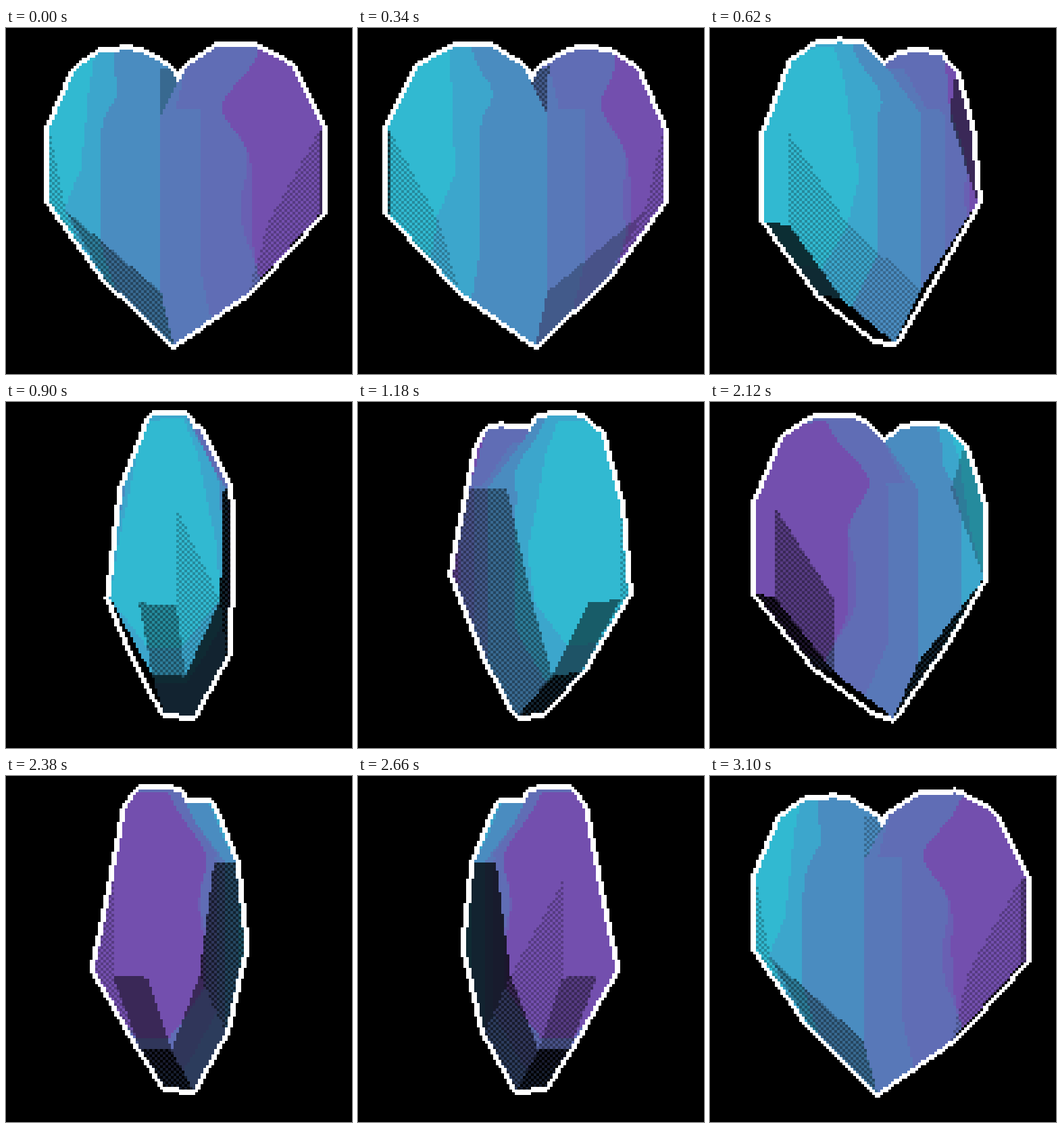
An HTML page with a canvas that plays this animation: 512 px wide and 512 px high, repeating every 3.12 s.

```html
<!DOCTYPE html>
<html lang="en">
<head>
<meta charset="utf-8">
<title>Turning gem heart</title>
<style>
html, body { margin: 0; width: 100%; height: 100%; overflow: hidden; background: #000; }
canvas { display: block; width: 512px; height: 512px; image-rendering: pixelated; }
</style>
</head>
<body>
<canvas id="c" width="128" height="128"></canvas>
<script>
const N = 128, PX = 4, LOOP = 3120, STEP = 20;
const EYE = 1000, CX = 256, HORIZON = 132;
const ctx = document.getElementById('c').getContext('2d');
const img = ctx.createImageData(N, N);
const depth = new Float32Array(N * N);

// Colour bands run from left to right; their borders bend with the height y.
const bands = [[49, 185, 209], [60, 166, 204], [74, 140, 192], [88, 120, 184],
  [96, 109, 181], [105, 96, 179], [115, 79, 174]];
const clamp = (v, lo, hi) => Math.max(lo, Math.min(hi, v));
const bump = (y, mid, width) => Math.exp(-(((y - mid) / width) ** 2));
const purple = y => 128 - 42 * bump(y, -15, 45);
const borders = [
  y => -128 - 25 * clamp((y - 75) / 57, 0, 1),
  y => -95 + 21 * bump(y, -35, 30),
  () => 0,
  y => y < -10 ? 20 : 57,
  y => purple(y) - 14 * bump(y, 120, 50),
  purple
];
const bandAt = (x, y) => bands[borders.findLastIndex(edge => x > edge(y)) + 1];

const sub = (a, b) => a.map((v, i) => v - b[i]);
const dot = (a, b) => a[0] * b[0] + a[1] * b[1] + a[2] * b[2];
const cross = (a, b) => [a[1] * b[2] - a[2] * b[1], a[2] * b[0] - a[0] * b[2], a[0] * b[1] - a[1] * b[0]];

// Shades give a light level from 0 to 8. n is the turned normal;
// near tells how far this end of the heart points at the viewer.
const full = () => 8;
const lit = n => 16 * n[2] + 0.5 * n[0] - 8.2 * n[1] - 1.7;
const shoulder = (n, near) => near < 0 ? 8 - 10 * near ** 4 : 8;
const frontSide = () => 7;
const backSide = (n, near) => 2 + 7 * Math.max(0, near) ** 2;

const faces = [];
function addFace(pts, shade, sx = 1) {
  let n = cross(sub(pts[1], pts[0]), sub(pts[2], pts[0]));
  const len = Math.hypot(...n) * Math.sign(dot(n, sub(pts[0], [0, 100, 0])));
  n = n.map(v => v / len);
  faces.push({ pts, n, shade, sx });
}

// One quarter of the mesh, mirrored below; y points down from eye level.
const RIM = 22, FRONT = 70;
const [A, J, F, B] = [[0, -4], [72, -4], [151, 136], [0, 242]].map(p => [...p, FRONT]);
const rim = [[20, -73], [66, -99], [117, -99], [162, -73], [208, 19], [208, 132], [112, 243], [0, 330]]
  .map(p => [...p, RIM]);
const [S1, S2, S3, S4, E, G, H, C] = rim;
const flip = (p, sx, sz) => [p[0] * sx, p[1], p[2] * sz];

for (const sz of [-1, 1]) {
  for (const sx of [-1, 1]) {
    const add = (pts, shade) => addFace(pts.map(p => flip(p, sx, sz)), shade, sx);
    [A, S1, S2, S3].forEach((p, i) => add([J, p, rim[i]], full));
    add([E, F, J, S4], shoulder);
    add([G, H, F, E], sz > 0 ? frontSide : backSide);
    add([F, B, C, H], lit);
  }
  addFace([J, flip(J, -1, 1), flip(F, -1, 1), B, F].map(p => flip(p, 1, sz)), lit);
}
for (const sx of [-1, 1]) {
  const strip = (p, q, shade) =>
    addFace([flip(p, sx, 1), flip(q, sx, 1), flip(q, sx, -1), flip(p, sx, -1)], shade, sx);
  strip(A, S1, lit);
  for (let i = 0; i < rim.length - 1; i++) strip(rim[i], rim[i + 1], i < 4 ? full : lit);
}

function setPixel(i, r, g, b) {
  img.data.set([r, g, b, 255], i * 4);
}

function fillTriangle(a, b, c, level) {
  const area = (b.x - a.x) * (c.y - a.y) - (b.y - a.y) * (c.x - a.x);
  if (Math.abs(area) < 1e-6) return;
  const range = k => [
    Math.max(0, Math.floor(Math.min(a[k], b[k], c[k]))),
    Math.min(N - 1, Math.ceil(Math.max(a[k], b[k], c[k])))
  ];
  const [x0, x1] = range('x'), [y0, y1] = range('y');
  for (let y = y0; y <= y1; y++) for (let x = x0; x <= x1; x++) {
    const px = x + 0.5, py = y + 0.5;
    const u = ((b.x - px) * (c.y - py) - (b.y - py) * (c.x - px)) / area;
    const v = ((c.x - px) * (a.y - py) - (c.y - py) * (a.x - px)) / area;
    const w = 1 - u - v;
    if (Math.min(u, v, w) < -1e-6) continue;
    const k = u * a.k + v * b.k + w * c.k, i = y * N + x;
    if (k <= depth[i]) continue;
    depth[i] = k;
    const mix = j => (u * a.k * a.p[j] + v * b.k * b.p[j] + w * c.k * c.p[j]) / k;
    // Odd levels are a checkerboard of the two solid tones around them.
    const light = ((level >> 1) + (level & (x + y) & 1)) / 4;
    setPixel(i, ...bandAt(mix(0), mix(1)).map(ch => ch * light));
  }
}

function touchesShape(x, y) {
  for (let dy = -2; dy <= 2; dy++) {
    const reach = 2 - Math.abs(dy);
    for (let dx = -reach; dx <= reach; dx++) if (depth[(y + dy) * N + x + dx]) return true;
  }
  return false;
}

function render(t) {
  const angle = 2 * Math.PI * (t - 180) / LOOP;
  const cs = Math.cos(angle), sn = Math.sin(angle);
  const turn = ([x, y, z]) => [x * cs + z * sn, y, z * cs - x * sn];
  depth.fill(0);

  for (const { pts, n, shade, sx } of faces) {
    const m = turn(n);
    if (dot(m, sub([0, 0, EYE], turn(pts[0]))) <= 0) continue;
    const level = clamp(Math.round(shade(m, -sx * sn)), 0, 8);
    const s = pts.map(p => {
      const [x, y, z] = turn(p), k = EYE / (EYE - z);
      return { x: (CX + x * k) / PX, y: (HORIZON + y * k) / PX, k, p };
    });
    for (let i = 1; i < s.length - 1; i++) fillTriangle(s[0], s[i], s[i + 1], level);
  }

  for (let y = 0; y < N; y++) for (let x = 0; x < N; x++) {
    const i = y * N + x;
    if (depth[i]) continue;
    const v = touchesShape(x, y) ? 255 : 0;
    setPixel(i, v, v, v);
  }
  ctx.putImageData(img, 0, 0);
}

const start = performance.now();
let shown = -1;
function tick() {
  const t = Math.floor((performance.now() - start) % LOOP / STEP) * STEP;
  if (t !== shown) render(shown = t);
  requestAnimationFrame(tick);
}
tick();
</script>
</body>
</html>
```
